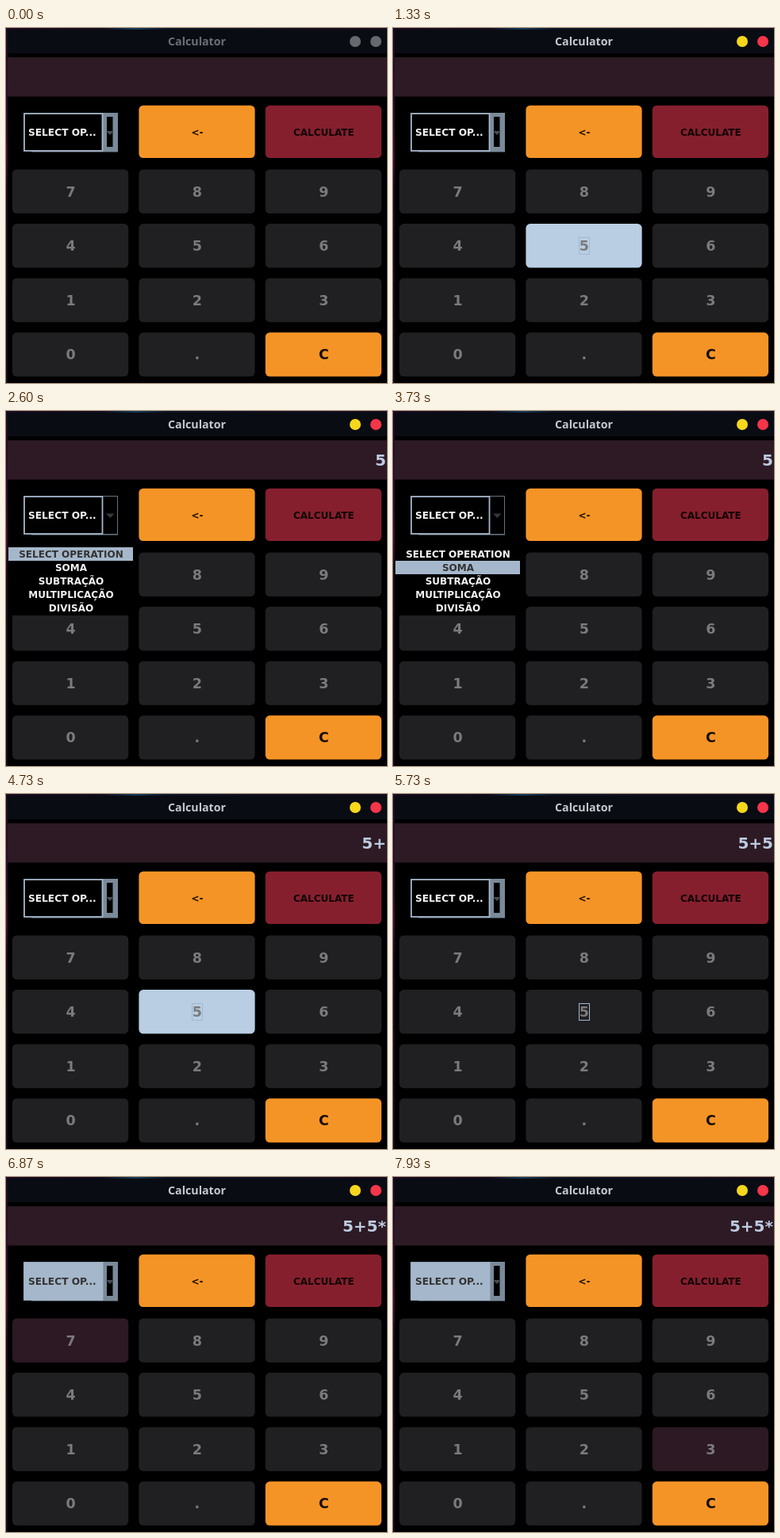
An HTML page that plays this animation: 480 px wide and 448 px high, repeating every 8000 ms.

```html
<!DOCTYPE html>
<html lang="en">
<head>
<meta charset="utf-8">
<title>Calculator</title>
<style>
  html, body { margin: 0; width: 100%; height: 100%; overflow: hidden; background: #000; }
  svg { display: block; width: 480px; height: 448px; }
  text { font: bold 12px "DejaVu Sans", sans-serif; text-anchor: middle; }
  .title { font: bold 14.2px "Noto Sans", sans-serif; fill: #c5c9cf; }
  .entry { font-size: 20px; text-anchor: end; fill: #bccbe0; }
  .digit { font-size: 17.5px; fill: #7b7b7c; }
  .key { fill: #202023; }
  .orange { fill: #f59426; }
  .red { fill: #861f2d; }
  .light { fill: #a5b7ca; }
  .white { fill: #f2f2f2; }

  /* One loop is 8 s, so 1% is 80 ms; every change is a hard cut. */
  .title, .dot, .entry, .key, .focus, .popup, .row, .bar, .comboBox, .comboText, .arrow {
    animation: 8s step-end infinite;
  }

  /* Window activation */
  .title { animation-name: title; }
  .dot.min { animation-name: minimise; }
  .dot.close { animation-name: close; }
  @keyframes title { 0% { fill: #6c6f74; } 16.6%, 100% { fill: #c5c9cf; } }
  @keyframes minimise { 0% { fill: #66696d; } 16.6%, 100% { fill: #f6d71c; } }
  @keyframes close { 0% { fill: #66696d; } 16.6%, 100% { fill: #f53549; } }

  /* Display contents */
  .entry { opacity: 0; }
  .e0 { animation-name: entry0; }
  .e1 { animation-name: entry1; }
  .e2 { animation-name: entry2; }
  .e3 { animation-name: entry3; }
  @keyframes entry0 { 0%, 50% { opacity: 0; } 18.375% { opacity: 1; } }
  @keyframes entry1 { 0%, 60.875% { opacity: 0; } 50% { opacity: 1; } }
  @keyframes entry2 { 0%, 85% { opacity: 0; } 60.875% { opacity: 1; } }
  @keyframes entry3 { 0% { opacity: 0; } 85%, 100% { opacity: 1; } }

  /* Key hover and press */
  .k7 { animation-name: key7; }
  .k4 { animation-name: key4; }
  .k5 { animation-name: key5; }
  .k2 { animation-name: key2; }
  .k3 { animation-name: key3; }
  @keyframes key7 {
    0%, 30%, 53.375%, 71.25%, 87.5% { fill: #202023; }
    26.625%, 50%, 69.125%, 85% { fill: #2c1923; }
  }
  @keyframes key4 { 0%, 90% { fill: #202023; } 87.5% { fill: #2c1923; } }
  @keyframes key5 {
    0%, 22.5%, 67.5% { fill: #202023; }
    16.6%, 59.1% { fill: #b9cee3; }
    18.375%, 55.875%, 60.875% { fill: #2c1923; }
  }
  @keyframes key2 { 0%, 94.125% { fill: #202023; } 90.875% { fill: #2c1923; } }
  @keyframes key3 { 0% { fill: #202023; } 95%, 100% { fill: #2c1923; } }
  .focus { fill: none; stroke: #a3b8cc; opacity: 0; animation-name: focus; }
  @keyframes focus { 0%, 31.625%, 72.5% { opacity: 0; } 16.6%, 59.1% { opacity: 1; } }

  /* Drop-down list */
  .popup, .arrow.open { opacity: 0; animation-name: popup; }
  @keyframes popup { 0%, 50%, 85% { opacity: 0; } 31.625%, 72.5% { opacity: 1; } }
  .bar { fill: #a5b7ca; animation-name: bar; }
  @keyframes bar {
    0%, 72.5% { transform: none; }
    38.375%, 74.125% { transform: translateY(17px); }
    75% { transform: translateY(34px); }
    80%, 100% { transform: translateY(51px); }
  }
  .row { fill: #f2f2f2; }
  .r0 { animation-name: row0; }
  .r1 { animation-name: row1; }
  .r2 { animation-name: row2; }
  .r3 { animation-name: row3; }
  @keyframes row0 { 0%, 72.5% { fill: #333; } 38.375%, 74.125% { fill: #f2f2f2; } }
  @keyframes row1 { 0%, 72.5%, 75% { fill: #f2f2f2; } 38.375%, 74.125% { fill: #333; } }
  @keyframes row2 { 0%, 80% { fill: #f2f2f2; } 75% { fill: #333; } }
  @keyframes row3 { 0% { fill: #f2f2f2; } 80%, 100% { fill: #333; } }
  .comboBox { animation-name: comboBox; }
  .comboText { text-anchor: start; font-size: 12.2px; animation-name: comboText; }
  @keyframes comboBox { 0%, 59.1% { fill: #000; } 50%, 85%, 100% { fill: #a5b7ca; } }
  @keyframes comboText { 0%, 59.1% { fill: #f2f2f2; } 50%, 85%, 100% { fill: #333; } }
</style>
</head>
<body>
<svg viewBox="0 0 480 448">
  <defs>
    <linearGradient id="top">
      <stop offset="0" stop-color="#1a0a20"/>
      <stop offset=".25" stop-color="#120a1c"/>
      <stop offset=".34" stop-color="#123a58"/>
      <stop offset=".42" stop-color="#0c1426"/>
      <stop offset="1" stop-color="#160a1e"/>
    </linearGradient>
    <linearGradient id="side" x2="0" y2="1">
      <stop offset="0" stop-color="#1c0a24"/>
      <stop offset=".3" stop-color="#3c0c38"/>
      <stop offset=".36" stop-color="#4a0c3e"/>
      <stop offset=".45" stop-color="#200a26"/>
      <stop offset="1" stop-color="#180a20"/>
    </linearGradient>
  </defs>

  <rect width="480" height="448"/>
  <rect width="480" height="3" fill="url(#top)"/>
  <rect width="2" height="448" fill="url(#side)"/>
  <path d="M2 32V6q0-4 4-4H480V32z" fill="#0a0c13"/>
  <text class="title" x="240.5" y="22">Calculator</text>
  <circle class="dot min" cx="440" cy="17" r="7"/>
  <circle class="dot close" cx="466" cy="17" r="7"/>

  <rect x="2" y="37" width="478" height="49.5" fill="#2d1a24"/>
  <text class="entry e0" x="479" y="69">5</text>
  <text class="entry e1" x="479" y="69">5+</text>
  <text class="entry e2" x="479" y="69">5+5</text>
  <text class="entry e3" x="479" y="69">5+5*</text>

  <g id="keys"></g>
  <rect class="focus" x="234.5" y="264.5" width="13" height="21"/>

  <g id="combo">
    <rect x="32" y="154" width="109" height="2.5" fill="#7a8a99"/>
    <rect x="121" y="107" width="20" height="49" fill="#7a8a99"/>
    <rect x="127" y="112" width="7.5" height="38"/>
    <path d="M126 130h10l-5 5z" fill="#454c54"/>
    <g class="arrow open">
      <rect x="121.5" y="107.5" width="19" height="48" stroke="#66727e"/>
      <path d="M126 129.500h10.500l-5.250 5.500z" fill="#343a40"/>
    </g>
    <rect class="comboBox" x="23" y="108" width="98.500" height="47" stroke="#a5b7ca" stroke-width="1.800"/>
    <text class="comboText" x="28" y="135.500">SELECT OP...</text>
  </g>

  <g class="popup">
    <rect x="3" y="172" width="157" height="86"/>
    <rect class="bar" x="3" y="172" width="157" height="17"/>
    <g id="rows"></g>
  </g>
</svg>
<script>
  const SVG = 'http://www.w3.org/2000/svg';

  function add(parent, tag, attrs, label = '') {
    const node = document.createElementNS(SVG, tag);
    for (const name in attrs) node.setAttribute(name, attrs[name]);
    node.textContent = label;
    document.getElementById(parent).append(node);
  }

  function button(col, y, height, label, box, text, rise) {
    const x = 8 + col * 159.4;
    add('keys', 'rect', { x, y, width: 146.2, height, rx: 5.5, class: box });
    add('keys', 'text', { x: x + 73.5, y: y + height / 2 + rise, ...text }, label);
  }

  button(1, 97.7, 66.3, '<-', 'orange', { fill: '#160d03' }, 5.3);
  button(2, 97.7, 66.3, 'CALCULATE', 'red', { fill: '#120306' }, 5.3);

  ['789', '456', '123', '0.C'].forEach((line, row) => {
    [...line].forEach((label, col) => {
      const clear = label === 'C';
      const text = clear ? { class: 'digit', style: 'fill:#140c02' } : { class: 'digit' };
      button(col, 178.5 + row * 68.6, 55.5, label, clear ? 'orange' : `key k${label}`, text, 6.3);
    });
  });

  ['SELECT OPERATION', 'SOMA', 'SUBTRAÇÃO', 'MULTIPLICAÇÃO', 'DIVISÃO'].forEach((label, i) =>
    add('rows', 'text', { x: 82, y: 185 + i * 17, class: `row r${i}` }, label));
</script>
</body>
</html>
```
